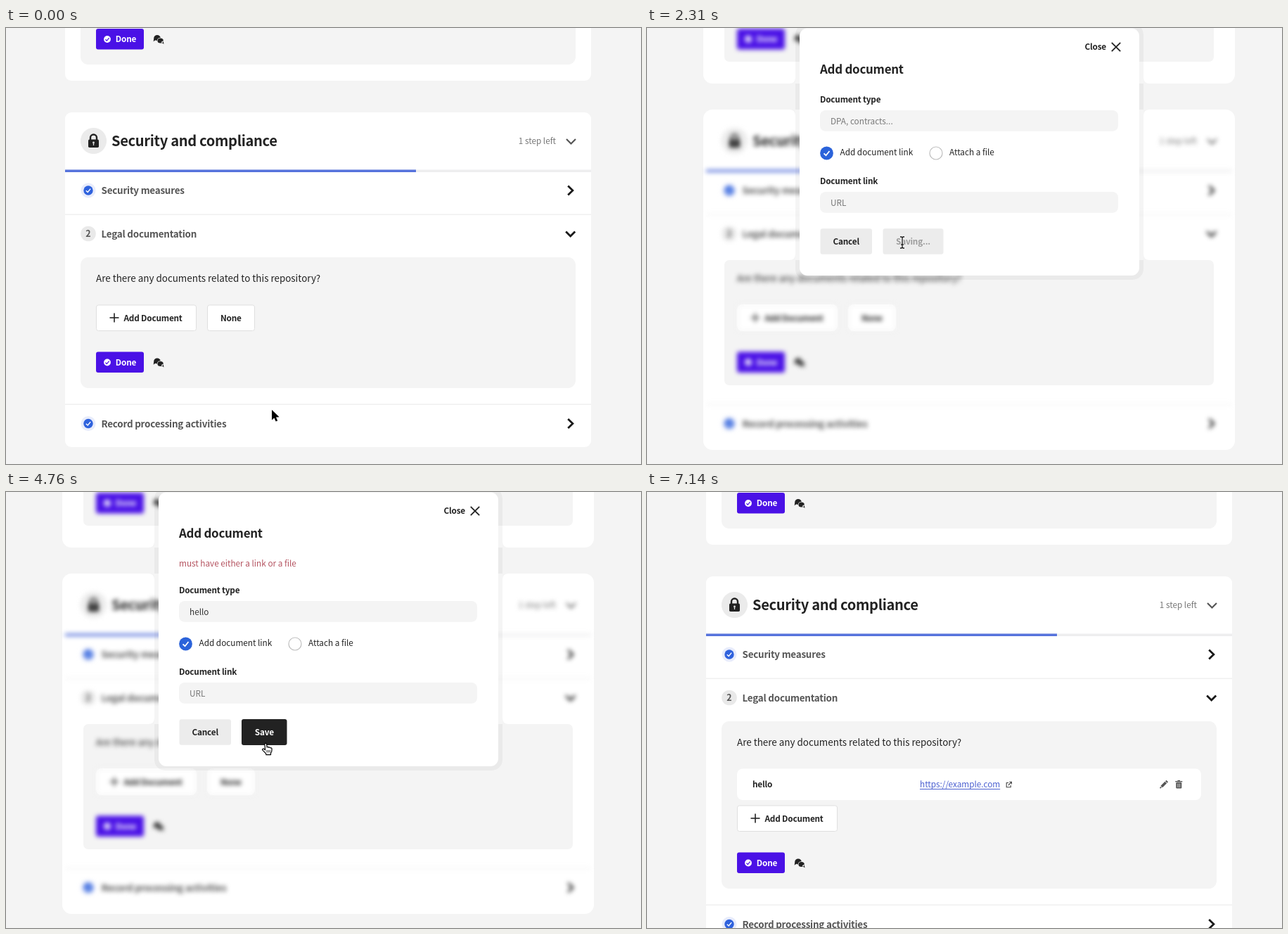
Recreate the animation shown at these times as an HTML page with a canvas. Size 903 by 620 pixels, loop 7420 ms.

```html
<!DOCTYPE html>
<html lang="en">
<head>
<meta charset="utf-8">
<title>Add document</title>
<style>
html, body { margin: 0; width: 100%; height: 100%; overflow: hidden; background: #f4f4f4; }
canvas { display: block; width: 903px; height: 620px; }
</style>
</head>
<body>
<canvas id="stage" width="903" height="620"></canvas>
<script>
const W = 903, H = 620, LOOP = 7420, STEP = 70;
const FACE = '"Noto Sans CJK JP", "Noto Sans CJK SC", "Noto Sans CJK", "Noto Sans", sans-serif';
const BASE = 13.42, SMALL = 11.75;
const GREY = '#f4f4f4', INK = '#222', VIOLET = '#4a11e6', BLUE = '#2f62dd';
const view = document.getElementById('stage').getContext('2d');
let g = view;

function layer() {
  const c = document.createElement('canvas');
  c.width = W;
  c.height = H;
  return c;
}

function text(s, x, y, size, color, bold) {
  g.font = `${bold ? 700 : 400} ${size}px ${FACE}`;
  g.letterSpacing = bold ? `${-0.016 * size}px` : '0px';
  g.fillStyle = color;
  g.fillText(s, x, y);
  return g.measureText(s).width;
}

function box(x0, y0, x1, y1, r, fill, stroke, lw = 1) {
  g.beginPath();
  g.roundRect(x0, y0, x1 - x0, y1 - y0, r);
  if (fill) { g.fillStyle = fill; g.fill(); }
  if (stroke) { g.strokeStyle = stroke; g.lineWidth = lw; g.stroke(); }
}

function disc(x, y, r, fill, stroke, lw = 1) {
  box(x - r, y - r, x + r, y + r, r, fill, stroke, lw);
}

function line(color, lw, ...pts) {
  g.strokeStyle = color;
  g.lineWidth = lw;
  g.beginPath();
  for (let i = 0; i < pts.length; i += 2) g.lineTo(pts[i], pts[i + 1]);
  g.stroke();
}

function tick(x, y, s, color) {
  line(color, s * 0.45, x - s, y + 0.1 * s, x - 0.25 * s, y + 0.8 * s, x + s, y - 0.75 * s);
}

function chevron(x, y, dx, dy, color, lw) {
  if (dx) line(color, lw, x - 3.5, y - 6.5, x + 3.2, y, x - 3.5, y + 6.5);
  else line(color, lw, x - 6.5, y - 3, x, y + 3.5, x + 6.5, y - 3);
}

// ---- page ----
function cards(saved, soft) {
  const d = saved ? 52 : 0, k = soft ? 4 : 0;
  box(84 - k, -30, 832 + k, 75 + k, 9 + k, '#fff');
  box(106 + k, -30, 810 - k, 52 - k, 11 - k, GREY);
  box(84 - k, 120 - k, 832 + k, 596 + d + k, 9 + k, '#fff');
  box(106 + k, 326 + k, 810 - k, 512 + d - k, 11 - k, GREY);
  if (soft) {
    box(128, 393, 271, 431, 8, '#fff');
    box(286, 393, 354, 431, 8, '#fff');
  }
}

function chat(x, y) {
  const bubble = (cx, cy, rx, ry, tail) => {
    g.beginPath();
    g.ellipse(cx, cy, rx, ry, 0, 0, 7);
    g.moveTo(cx + tail * 1, cy + 2);
    g.lineTo(cx + tail * (rx + 0.6), cy + ry + 1.3);
    g.lineTo(cx + tail * rx, cy);
    g.fill();
  };
  g.fillStyle = INK;
  bubble(x - 2, y - 2, 4.7, 4, -1);
  g.fillStyle = GREY;
  bubble(x + 2.8, y + 2.2, 5.2, 4.5, 1);
  g.fillStyle = INK;
  bubble(x + 2.6, y + 2, 4.2, 3.6, 1);
}

function done(y) {
  box(128, y, 196, y + 29.5, 3, VIOLET);
  disc(144, y + 15, 4.9, '#fff');
  tick(144, y + 15, 2.6, VIOLET);
  text('Done', 155.8, y + 19, SMALL, '#fff', true);
  chat(217, y + 15);
}

function row(label, y, number) {
  if (number) {
    disc(117, y, 10.8, '#e9e9e9');
    text(number, 113.2, y + 4.8, 12.4, '#555', true);
  } else {
    disc(117, y, 10.5, '#e8ecfb');
    disc(117, y, 6.7, BLUE);
    tick(117, y, 3.2, '#fff');
  }
  text(label, 135.5, y + 5, BASE, '#555', true);
  chevron(802.7, y, !number, 0, '#1a1a1a', 2.8);
}

function addButton(y) {
  box(128.5, y + 0.5, 270.5, y + 37, 3, '#fff', '#dfdfdf');
  line(INK, 1.6, 147.5, y + 18.5, 160.5, y + 18.5);
  line(INK, 1.6, 154, y + 12, 154, y + 25);
  text('Add Document', 167.5, y + 23, SMALL, INK, true);
}

function savedRow() {
  box(128, 393.5, 788, 438, 8, '#fff');
  text('hello', 150, 420, SMALL, INK, true);
  const w = text('https://example.com', 388, 420, SMALL, '#4a5fd0');
  line('#4a5fd0', 1, 388, 422.5, 388 + w, 422.5);
  // external link
  line('#444', 1.1, 514, 413.5, 511.2, 413.5, 511.2, 419.8, 517.2, 419.8, 517.2, 417);
  line('#444', 1.1, 513.7, 417.2, 518.2, 412.5);
  line('#444', 1.1, 515.3, 412.3, 518.4, 412.3, 518.4, 415.4);
  // pencil
  line('#555', 3.6, 731.8, 419, 737.8, 413);
  line('#555', 3.6, 738.4, 412.4, 739.8, 411);
  line('#555', 1.6, 729.6, 421.2, 731.4, 419.4);
  // bin
  box(752.3, 413, 760.3, 421.5, 1.2, '#555');
  line('#555', 1.4, 751.3, 411.7, 761.3, 411.7);
  line('#555', 1.4, 754.5, 410.6, 758, 410.6);
  for (const x of [754.6, 756.3, 758]) line('#ddd', 0.7, x, 414.5, x, 420);
}

function lock() {
  disc(124.5, 160.5, 18.6, '#ebebeb');
  g.strokeStyle = INK;
  g.lineWidth = 2.4;
  g.beginPath();
  g.moveTo(120, 160);
  g.lineTo(120, 156);
  g.arc(124.5, 156, 4.5, Math.PI, 0);
  g.lineTo(129, 160);
  g.stroke();
  box(117, 158.5, 132, 170, 1.8, INK);
  disc(124.5, 163, 1.4, '#ddd');
  line('#ddd', 1.3, 124.5, 163, 124.5, 167);
}

function content(saved) {
  const d = saved ? 52 : 0;
  done(1);
  lock();
  text('Security and compliance', 150, 168, 20.1, INK, true);
  text('1 step left', 728.8, 164.6, SMALL, '#777');
  chevron(803.5, 161, 0, 1, '#555', 2.2);
  box(84, 201.5, 832, 205, 0, '#eeeeef');
  box(84, 201.5, 583, 205, 0, '#5673dc');
  row('Security measures', 231);
  box(84, 264.5, 832, 266, 0, '#f0f0f0');
  row('Legal documentation', 292.5, '2');
  text('Are there any documents related to this repository?', 128, 361, BASE, INK);
  if (saved) savedRow();
  else {
    box(286.5, 394, 353.5, 430.5, 3, '#fff', '#dfdfdf');
    text('None', 305, 416.5, SMALL, INK, true);
  }
  addButton(393.5 + d);
  done(460.5 + d);
  box(84, 534.5 + d, 832, 536 + d, 0, '#f0f0f0');
  row('Record processing activities', 562.5 + d);
}

function makePage(saved, blur) {
  const sheet = layer(), ink = layer();
  g = ink.getContext('2d');
  content(saved);
  g = sheet.getContext('2d');
  g.fillStyle = GREY;
  g.fillRect(0, 0, W, H);
  cards(saved, blur > 0);
  if (blur) g.filter = `blur(${blur}px)`;
  g.drawImage(ink, 0, 0);
  g = view;
  return sheet;
}

// ---- timeline ----
const ERROR1 = 2450, ERROR2 = 4550, CLOSED = 6370;
const within = (t, a, b) => t >= a && t < b;

function stateAt(t) {
  const err = t >= ERROR1, blank = within(t, ERROR1, ERROR2);
  const off = !err ? 0 : blank ? 59.5 : 38;
  const typed = [3080, 3150, 3290, 3430, 3570].filter(k => t >= k).length;
  return {
    err, blank, off,
    typeY: err ? 155 : 117,
    linkY: 233 + off,
    type: 'hello'.slice(0, typed),
    url: t >= 5530 ? 'https://example.com' : '',
    saving: within(t, 2030, ERROR1) || within(t, 4270, ERROR2) || within(t, 6160, CLOSED),
    typeFocus: within(t, 2800, 4270),
    linkFocus: within(t, 5180, 6160),
    open: within(t, 1050, CLOSED)
  };
}

// time, x, y of the pointer's hot spot
const PATH = [
  [0, 378, 543], [350, 332, 482], [420, 332, 482], [630, 210, 409],
  [1190, 210, 409], [1400, 325, 187], [1540, 350, 120], [1680, 355, 150], [1960, 363, 303],
  [2030, 363, 305], [2450, 363, 305], [2730, 370, 162],
  [3780, 370, 162], [4130, 368, 347], [4550, 368, 347], [4760, 369.5, 357],
  [4900, 369.5, 357], [5180, 366, 288], [5670, 366, 288], [5950, 375, 345],
  [6300, 375, 345], [6440, 440, 348], [7140, 140, 622]
];

function pointer(t) {
  let i = 1;
  while (i < PATH.length - 1 && PATH[i][0] < t) i++;
  const [t0, x0, y0] = PATH[i - 1], [t1, x1, y1] = PATH[i];
  const k = Math.min(1, (t - t0) / (t1 - t0));
  return { x: x0 + (x1 - x0) * k, y: y0 + (y1 - y0) * k };
}

// ---- modal ----
function corner(x, y, sx, sy, r = 9) {
  g.fillStyle = GREY;
  g.beginPath();
  g.moveTo(x, y);
  g.lineTo(x + sx * r, y);
  g.quadraticCurveTo(x, y, x, y + sy * r);
  g.fill();
}

function field(y, value, hint, focus, hover, bad) {
  const line1 = bad ? '#e895a1' : focus ? '#8f9ff0' : '#c3caef';
  const ring = bad ? '#f9d5da' : '#e1e6fb';
  if (focus || hover) box(244, y - 2.8, 672, y + 32.6, 10, ring);
  const edge = focus || hover || bad;
  box(246, y - (edge ? 0.7 : 0), 670, y + 29.8 + (edge ? 0.7 : 0), 8,
    bad ? '#ffecee' : GREY, edge ? line1 : null, 1.2);
  const color = bad && value ? '#a5404e' : value ? '#333' : '#777';
  const w = text(value || hint, 261, y + 19.5, SMALL, color);
  if (focus) {
    const x = 261.5 + (value ? w : 0);
    line(bad ? '#8a2c3a' : INK, 1, x, y + 7, x, y + 23);
  }
}

function modal(s, p) {
  const o = s.off, bottom = 352 + o;
  const over = (x0, y0, x1, y1) => p.on && p.x > x0 && p.x < x1 && p.y > y0 && p.y < y1;
  box(211, -6, 706, bottom + 6, 15, 'rgba(0,0,0,.04)');
  for (const [x, side] of [[211, -1], [706, 1]]) {
    corner(x, 79, side, -1);
    corner(x, 116, side, 1);
    corner(x, 330, side, -1);
  }
  box(217, 0.5, 700, bottom, 11, '#fff');
  text('Close', 622.5, 31, SMALL, INK, true);
  line(INK, 1.8, 660.8, 20.8, 673.2, 33.2);
  line(INK, 1.8, 673.2, 20.8, 660.8, 33.2);
  text('Add document', 246, 65, 16.95, INK, true);
  if (s.err) text('must have either a link or a file', 246, 105.8, SMALL, '#b4525f');

  text('Document type', 246, s.typeY - 11.2, SMALL, INK, true);
  field(s.typeY, s.type, 'DPA, contracts...', s.typeFocus, over(246, s.typeY, 670, s.typeY + 30), s.blank);
  if (s.blank) text("can't be blank", 246, 202.5, 11.1, '#a8404f');

  disc(255.5, 178 + o, 9.4, '#2b63da');
  tick(255.5, 178 + o, 4, '#fff');
  text('Add document link', 274.5, 181 + o, SMALL, INK);
  disc(411, 178 + o, 9, '#fff', '#bdbdbd', 1.2);
  text('Attach a file', 430, 181 + o, SMALL, INK);

  text('Document link', 246, s.linkY - 11.2, SMALL, INK, true);
  field(s.linkY, s.url, 'URL', s.linkFocus, over(246, s.linkY, 670, s.linkY + 30));

  box(246.5, 285.3 + o, 320, 321.7 + o, 3, '#ececec');
  text('Cancel', 264.5, 307.6 + o, SMALL, INK, true);
  if (s.saving) {
    box(335.5, 285.3 + o, 421.5, 321.7 + o, 3, '#ececec');
    text('Saving...', 354, 307.6 + o, SMALL, '#9c9c9c', true);
  } else {
    box(335, 285 + o, 399.5, 322 + o, 3, over(335, 285 + o, 400, 322 + o) ? INK : VIOLET);
    text('Save', 353.8, 307.6 + o, SMALL, '#fff', true);
  }
}

// ---- pointer shapes ----
function kind(s, { x, y }) {
  const inside = (x0, y0, x1, y1) => x > x0 && x < x1 && y > y0 && y < y1;
  if (!s.open) return inside(128, 393, 271, 431) ? 'hand' : 'arrow';
  if (inside(335, 285 + s.off, 400, 322 + s.off)) return s.saving ? 'beam' : 'hand';
  if (inside(246, s.typeY, 670, s.typeY + 30) || inside(246, s.linkY, 670, s.linkY + 30)) return 'beam';
  return 'arrow';
}

const SHAPES = {
  arrow: ['M0 0 L0 14.6 L3.4 11.4 L5.7 16.6 L8.2 15.5 L6 10.5 L10.6 10.2 Z', '#000', '#fff'],
  hand: ['M-1.7 1.4 Q-.2 -.8 1.1 1.4 L1.6 6 Q3 4.7 4.2 6.4 Q5.6 5.3 6.6 7 Q8.4 6.4 8.6 8.4 ' +
    'L8.3 12 L7 14.2 L7 16.6 L.4 16.6 L.1 14.8 L-5 9.6 Q-4.8 7.4 -2.6 8.4 L-.9 9.8 Z', '#fff', '#000']
};

function cursor(name, { x, y }) {
  g.save();
  g.translate(x, y);
  g.lineJoin = 'round';
  if (name === 'beam') {
    for (const [c, w] of [['#fff', 3], ['#111', 1.3]]) {
      line(c, w, -3, -8, -1, -8, 0, -7, 0, 7, -1, 8, -3, 8);
      line(c, w, 3, -8, 1, -8, 0, -7);
      line(c, w, 3, 8, 1, 8, 0, 7);
    }
    line('#111', 1.2, -2, 3, 2, 3);
  } else {
    const [d, fill, stroke] = SHAPES[name], path = new Path2D(d);
    g.lineWidth = name === 'arrow' ? 1.8 : 1.2;
    g.strokeStyle = stroke;
    g.fillStyle = fill;
    if (name === 'arrow') { g.stroke(path); g.fill(path); }
    else {
      g.fill(path);
      g.stroke(path);
      for (const i of [1.8, 3.9, 6]) line('#000', 0.8, i - 0.3, 10, i - 0.3, 13.4);
    }
  }
  g.restore();
}

const pages = { plain: makePage(false, 0), soft: makePage(false, 3), saved: makePage(true, 0) };

function draw(t) {
  const s = stateAt(t), p = pointer(t);
  p.on = !within(t, 3080, 3850) && !within(t, 5530, 5740) && t < 7140;
  g.drawImage(s.open ? pages.soft : t >= CLOSED ? pages.saved : pages.plain, 0, 0);
  if (s.open) {
    g.globalAlpha = t < 1120 ? 0.5 : 1;
    modal(s, p);
    g.globalAlpha = 1;
  }
  if (p.on) cursor(kind(s, p), p);
}

const start = performance.now();
function tickFrame(now) {
  const t = Math.max(0, now - start) % LOOP;
  draw(Math.floor(t / STEP) * STEP);
  requestAnimationFrame(tickFrame);
}
draw(0);
requestAnimationFrame(tickFrame);
</script>
</body>
</html>
```
